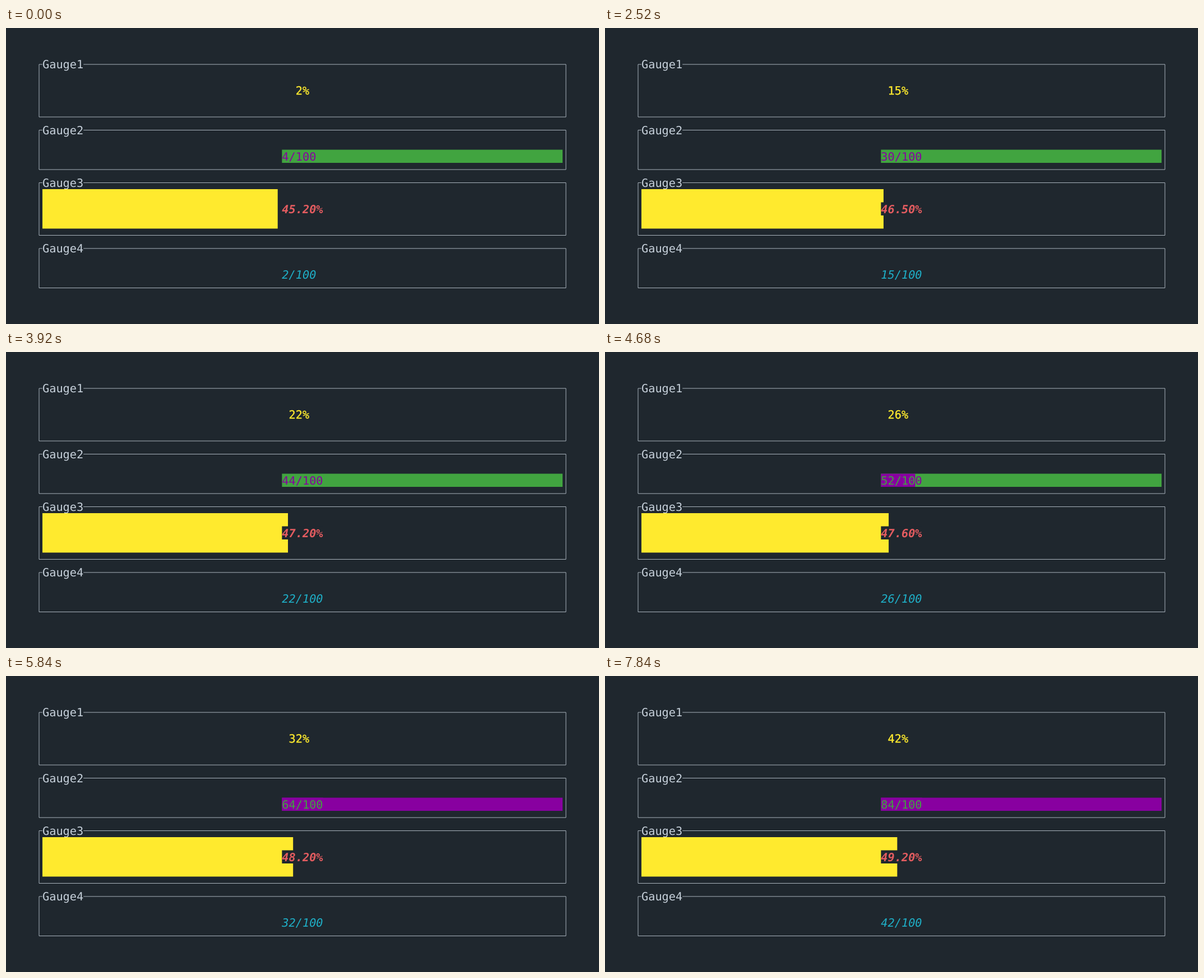
Recreate the animation shown at these times as an HTML page. Size 1058 px wide and 529 px high, loop 8000 ms.

```html
<!DOCTYPE html>
<html lang="en">
<head>
<meta charset="utf-8">
<title>Terminal gauges</title>
<style>
  html, body { margin: 0; width: 100%; height: 100%; overflow: hidden; background: #1f272e; }
  svg { display: block; width: 1058px; height: 529px; }
  /* The tiny rotation turns off baseline snapping, so rows can sit on half pixels. */
  text {
    font: 20.28px "DejaVu Sans Mono", monospace; white-space: pre;
    text-rendering: geometricPrecision; transform: rotate(0.001deg);
  }
  path { fill: none; stroke: #a9b3bc; }
</style>
</head>
<body>
<svg viewBox="0 0 1058 529"><g id="frames"></g><g id="gauges"></g></svg>
<script>
const LOOP = 8000, COLS = 76, LEFT = 65, CELL = 928 / COLS, ROW = 23.5;
const YELLOW = '#ffea2e', GREEN = '#41a440', PURPLE = '#8800a0', RED = '#e45c60', CYAN = '#1fb0c8', DARK = '#1f272e';

// Terminal grid: columns count from inside the left border, rows from the first title.
const colX = col => LEFT + col * CELL;
const rowY = row => 65 + row * ROW;
const text = (col, row, str, color, style = '') =>
  `<text x="${colX(col)}" y="${rowY(row) + 7}" fill="${color}" style="${style}">${str}</text>`;
const block = (from, to, row, rows, color) =>
  `<rect x="${colX(from)}" y="${rowY(row) - 12}" width="${(to - from) * CELL}" height="${rows * ROW}" fill="${color}"/>`;
const centered = str => Math.floor((COLS - str.length) / 2);

function frame(title, top, bottom) {
  return `<path d="M${LEFT} ${rowY(top)}H59V${rowY(bottom)}H999V${rowY(top)}H${colX(title.length)}"/>` +
    text(0, top, title, '#c6d0da');
}

function splitGauge(value) {
  const label = value + '/100', start = centered(label), end = start + label.length;
  const filled = Math.max(0, Math.min(label.length, Math.round(value / 100 * COLS) - start));
  const split = start + filled;
  // The rest of the row inherits the background of the label's last cell.
  const tail = split === end ? PURPLE : GREEN;
  return block(start, COLS, 7, 1, tail) +
    (filled ? block(start, split, 7, 1, PURPLE) : '') +
    text(start, 7, label.slice(0, filled), GREEN) +
    text(split, 7, label.slice(filled), PURPLE);
}

function blockGauge(percent) {
  const label = percent.toFixed(2) + '%', start = centered(label);
  const end = Math.round(percent / 100 * COLS * 8) / 8;
  return block(0, end, 10, 3, YELLOW) +
    block(start, start + label.length, 11, 1, DARK) +
    text(start, 11, label, RED, 'font-weight:bold;font-style:italic');
}

function gauges(n) {
  const percent = n + '%', ratio = n + '/100';
  return text(centered(percent), 2, percent, YELLOW, `stroke:${YELLOW};stroke-width:0.35px`) +
    splitGauge(2 * n) +
    blockGauge(45 + n / 10) +
    text(centered(ratio), 16, ratio, CYAN, 'font-style:italic');
}

// One tick every 200 ms, with two ticks shortened by 40 ms.
function countAt(t) {
  const skipped = 40 * ((t >= 4480) + (t >= 5440));
  return 2 + Math.floor((t + 80 + skipped) / 200);
}

document.getElementById('frames').innerHTML =
  frame('Gauge1', 0, 4) + frame('Gauge2', 5, 8) + frame('Gauge3', 9, 13) + frame('Gauge4', 14, 17);

const layer = document.getElementById('gauges');
const began = performance.now();
let shown;
function draw() {
  const n = countAt((performance.now() - began) % LOOP);
  if (n !== shown) layer.innerHTML = gauges(shown = n);
  requestAnimationFrame(draw);
}
draw();
</script>
</body>
</html>
```
